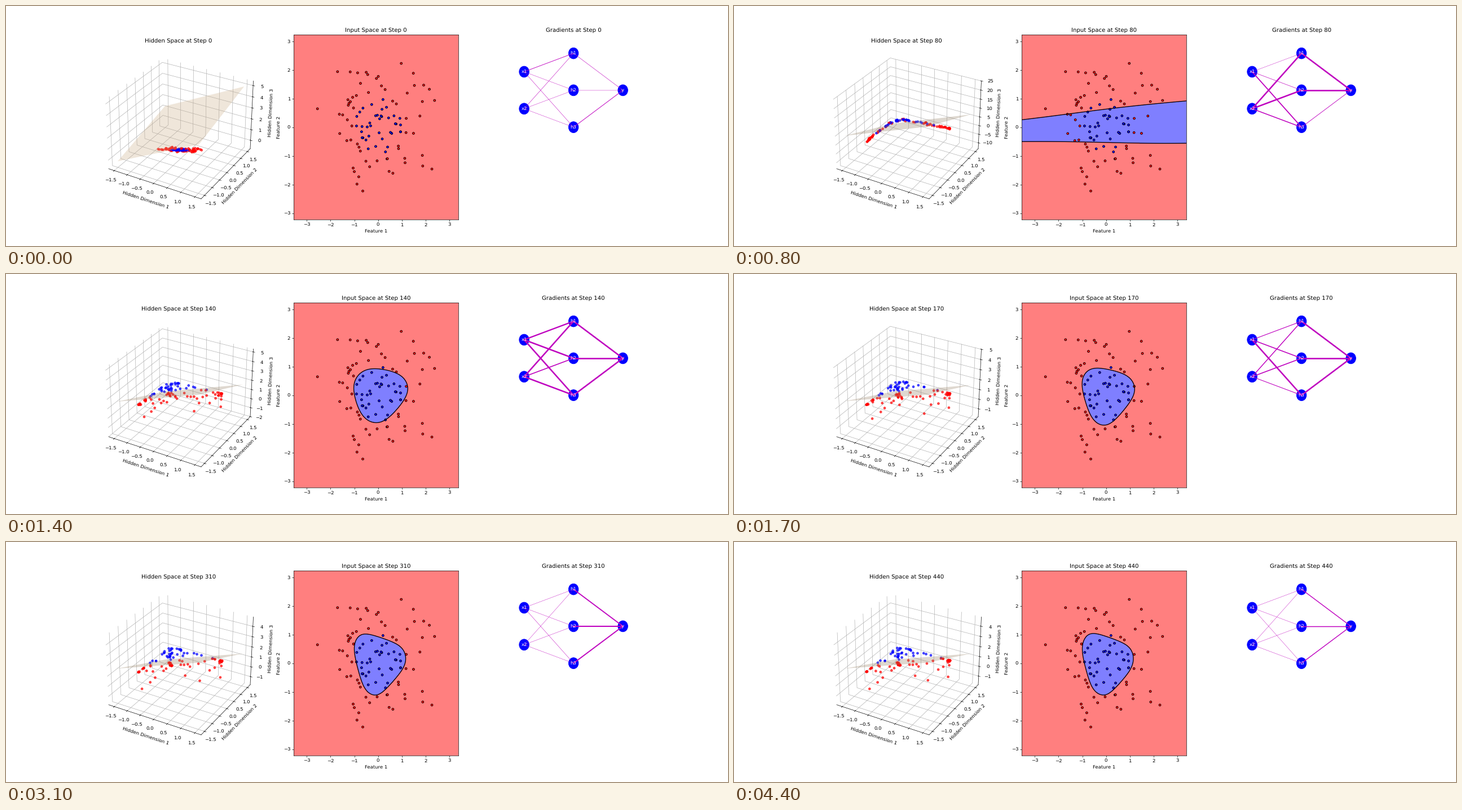
Write a matplotlib script that moves like this. It is 1280x427 px and loops after 4500 ms.

```python
import numpy as np
import matplotlib.pyplot as plt
from matplotlib.animation import FuncAnimation

FRAMES = 45
STEPS = 10
RATE = 1.0

plt.rcParams["text.hinting"] = "none"

np.random.seed(0)
X = np.random.randn(100, 2)
y = np.where((X ** 2).sum(axis=1) > 1, 1, -1).reshape(-1, 1)


def train():
    """Return the network state shown in each frame."""
    np.random.seed(0)
    W1, b1 = np.random.randn(2, 3) * 0.1, np.zeros((1, 3))
    W2, b2 = np.random.randn(3, 1) * 0.1, np.zeros((1, 1))
    states = []
    for step in range(1, STEPS * (FRAMES + 1) + 1):
        h = np.tanh(X @ W1 + b1)
        d2 = (np.tanh(h @ W2 + b2) - y) / len(X)
        d1 = d2 @ W2.T * (1 - h ** 2)
        g1, g2 = X.T @ d1, h.T @ d2
        W1 = W1 - RATE * g1
        b1 = b1 - RATE * d1.sum(axis=0, keepdims=True)
        W2 = W2 - RATE * g2
        b2 = b2 - RATE * d2.sum(axis=0, keepdims=True)
        if step % STEPS == 0 and step > STEPS:
            states.append((W1, b1, W2, b2, h, g1, g2))
    return states


states = train()
lo, hi = X.min(axis=0) - 1, X.max(axis=0) + 1
gx, gy = np.meshgrid(np.linspace(lo[0], hi[0], 150), np.linspace(lo[1], hi[1], 150))
grid = np.c_[gx.ravel(), gy.ravel()]
px, py = np.meshgrid([-1.5, 1.5], [-1.5, 1.5])

DPI = 1280 / 21
fig = plt.figure(figsize=(1280 / DPI, 427 / DPI), dpi=DPI)
ax_hidden = fig.add_subplot(131, projection="3d")
ax_input = fig.add_subplot(132)
ax_grad = fig.add_subplot(133)
for axis in (ax_hidden.xaxis, ax_hidden.yaxis, ax_hidden.zaxis):
    axis.set_pane_color("white")

INPUTS = [(0.2, 0.8), (0.2, 0.6)]
HIDDEN = [(0.5, 0.9), (0.5, 0.7), (0.5, 0.5)]
OUTPUT = [(0.8, 0.7)]
NAMES = ["x1", "x2", "h1", "h2", "h3", "y"]


def draw_hidden(W2, b2, h):
    ax_hidden.scatter(*h.T, c=y.ravel(), cmap="bwr", alpha=0.7)
    w = W2.ravel()
    pz = -(w[0] * px + w[1] * py + b2[0, 0]) / w[2]
    ax_hidden.plot_surface(px, py, pz, color="tan", alpha=0.3)
    ax_hidden.set_xlabel("Hidden Dimension 1")
    ax_hidden.set_ylabel("Hidden Dimension 2")
    ax_hidden.set_zlabel("Hidden Dimension 3")


def draw_input(W1, b1, W2, b2):
    out = (np.tanh(grid @ W1 + b1) @ W2 + b2).reshape(gx.shape)
    ax_input.contourf(gx, gy, out, levels=[-1e9, 0, 1e9], colors=["blue", "red"], alpha=0.5)
    if out.min() < 0 < out.max():
        ax_input.contour(gx, gy, out, levels=[0], colors="black")
    ax_input.scatter(*X.T, s=20, c=y.ravel(), cmap="bwr", edgecolors="k")
    ax_input.set_xlabel("Feature 1")
    ax_input.set_ylabel("Feature 2")


def draw_edges(starts, ends, grads):
    for (x0, y0), row in zip(starts, grads):
        for (x1, y1), g in zip(ends, row):
            width = np.clip(abs(g) * 400, 0.5, 3)
            ax_grad.plot([x0, x1], [y0, y1], color="m", linewidth=width)


def draw_grads(g1, g2):
    for name, pos in zip(NAMES, INPUTS + HIDDEN + OUTPUT):
        ax_grad.add_patch(plt.Circle(pos, 0.03, color="blue"))
        ax_grad.text(*pos, name, color="white", ha="center", va="center")
    draw_edges(INPUTS, HIDDEN, g1)
    draw_edges(HIDDEN, OUTPUT, g2)
    ax_grad.set_xlim(0, 1)
    ax_grad.set_ylim(0, 1)
    ax_grad.axis("off")


def update(frame):
    W1, b1, W2, b2, h, g1, g2 = states[frame]
    titles = ["Hidden Space", "Input Space", "Gradients"]
    for ax, title in zip([ax_hidden, ax_input, ax_grad], titles):
        ax.clear()
        ax.set_title(f"{title} at Step {frame * STEPS}")
    draw_hidden(W2, b2, h)
    draw_input(W1, b1, W2, b2)
    draw_grads(g1, g2)


anim = FuncAnimation(fig, update, frames=FRAMES, interval=100, init_func=lambda: None)
plt.show()
```
